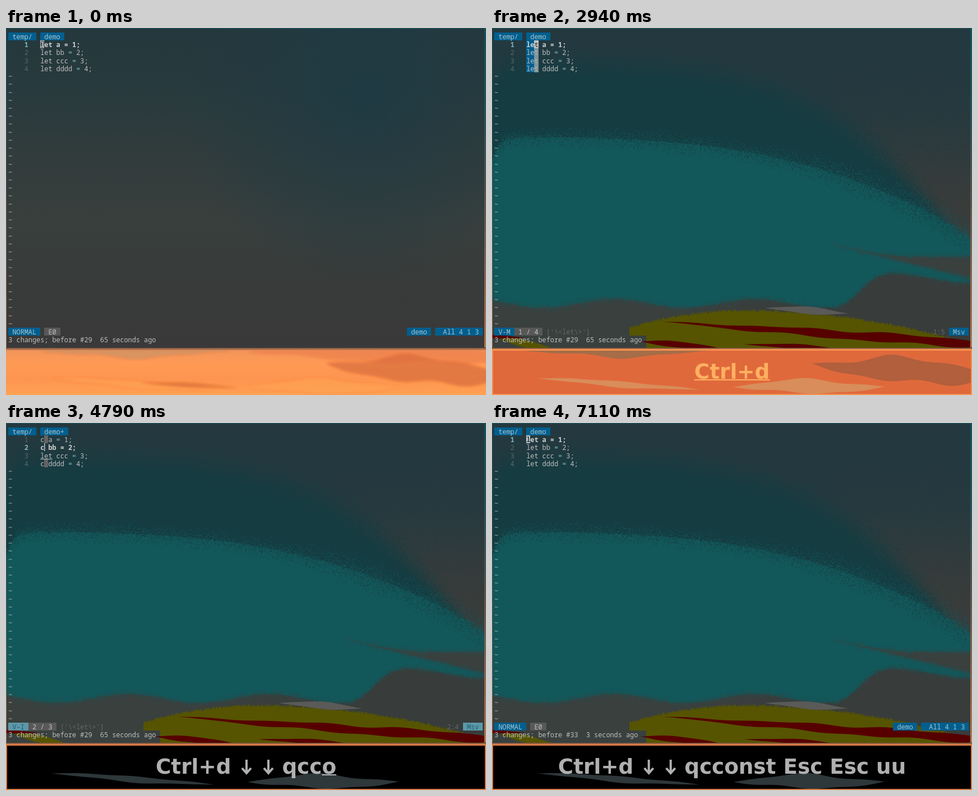
An HTML page with a canvas for the animation above (8 s loop, 856 by 654 pixels).

```html
<!DOCTYPE html>
<html lang="en">
<head>
<meta charset="utf-8">
<title>Multiple cursors demo</title>
<style>
html, body { margin: 0; width: 100%; height: 100%; overflow: hidden; background: #000; }
canvas { display: block; }
</style>
</head>
<body>
<canvas id="stage" width="856" height="654"></canvas>
<script>
const LOOP = 8000, WIDTH = 856, HEIGHT = 654;
const CELL = 7.11, ROW = 14.22, LEFT = 4.3, TOP = 8;
const BLUE = '#005f8f', GREY = '#585858', TEXT = '#bdbdbd', PALE = '#a9c3cd', DIM = '#59666a';
const ctx = document.getElementById('stage').getContext('2d');

let seed = 7;
const random = () => (seed = seed * 16807 % 2147483647) / 2147483647;
const mix = (a, b, u) => a.map((v, i) => v + (b[i] - v) * u);
const smooth = (from, to, v) => {
  const u = Math.min(1, Math.max(0, (v - from) / (to - from)));
  return u * u * (3 - 2 * u);
};

function layer(paint) {
  const canvas = document.createElement('canvas');
  canvas.width = WIDTH;
  canvas.height = HEIGHT;
  paint(canvas.getContext('2d'));
  return canvas;
}

function clipTo(c, ...rect) {
  c.beginPath();
  c.rect(...rect);
  c.clip();
}

function gradient(c, y0, y1, ...colors) {
  const g = c.createLinearGradient(0, y0, 0, y1);
  colors.forEach((color, i) => g.addColorStop(i / (colors.length - 1), color));
  return g;
}

// Lens-shaped wisp with an uneven outline
function streak(c, color, x0, y0, x1, y1, half) {
  c.fillStyle = color;
  for (let x = x0; x < x1; x++) {
    const u = (x - x0) / (x1 - x0);
    const h = half * Math.sin(Math.PI * u) * (.85 + .15 * Math.sin(x / 19 + y0));
    c.fillRect(x, y0 + (y1 - y0) * u + Math.sin(x / 31) * half / 8 - h, 1, 2 * h);
  }
}

// The same wisps show in the sky and through both key panels
const clouds = [
  ['blush', 430, 575, 1000, 588, 16],
  ['earth', 60, 574, 400, 574, 14],
  ['shade', 570, 599, 920, 622, 25],
  ['light', 80, 624, 370, 645, 6],
  ['light', 430, 638, 700, 640, 14],
  ['rust', 240, 632, 412, 641, 3]
];

function paintClouds(c, colors) {
  for (const [kind, ...shape] of clouds) if (colors[kind]) streak(c, colors[kind], ...shape);
}

const sky = layer(c => {
  c.fillStyle = gradient(c, 570, HEIGHT, '#f0945c', '#ff9a55', '#fd9550', '#ffa152');
  c.fillRect(0, 0, WIDTH, HEIGHT);
  c.filter = 'blur(2px)';
  paintClouds(c, { blush: '#f18350', earth: '#ce966b', shade: '#dc6d3f', light: '#ffa557', rust: '#d96f3c' });
  c.filter = 'none';
  c.fillStyle = gradient(c, 0, 572, '#15525b', '#25555a', '#545450', '#866752', '#b07a55');
  c.fillRect(0, 0, WIDTH, 571);
  c.fillStyle = gradient(c, 569, 576, '#70503f', '#a86d4b', 'rgba(240,148,92,0)');
  c.fillRect(0, 569, WIDTH, 7);
});

const softBack = layer(c => {
  clipTo(c, 1, 1, 852, 569);
  c.fillStyle = gradient(c, 0, 570, '#24383d', '#283a3d', '#323c3c', '#383f3d', '#383b3a', '#3a3939');
  c.fillRect(0, 0, WIDTH, HEIGHT);
  const glow = c.createRadialGradient(640, 120, 20, 640, 120, 330);
  glow.addColorStop(0, 'rgba(31,58,67,.9)');
  glow.addColorStop(1, 'rgba(31,58,67,0)');
  c.fillStyle = glow;
  c.fillRect(0, 0, WIDTH, HEIGHT);
});

const SLATE = [36, 57, 63], ASH = [56, 60, 59], DEEP = [20, 60, 65], TEAL = [18, 87, 90], GROUND = [57, 64, 62];
const tealTop = x => 193 + 180 * (x / WIDTH) ** 3 + 40 * Math.exp(-x / 12);
const tealBottom = x => 489 + 8 * Math.cos((x - 90) / 40) - 45 * smooth(610, 700, x);
const oliveTop = x => 503 + (x - 450) ** 2 / (x < 450 ? 1400 : 2700);

function inWedge(x, y) {
  const d = x - 605;
  return d > 0 && y > 384 + 22 * Math.sin(Math.min(1, d / 160) * Math.PI / 2) && y < 385 + d * .24;
}

function backColor(x, y) {
  const grain = (random() * 2 - 1) ** 3;
  const top = tealTop(x), edge = y + grain * (22 + 14 * smooth(420, 700, x));
  if (y + grain * 9 > tealBottom(x)) return mix(GROUND, ASH, smooth(250, 700, x));
  if (edge > top) return inWedge(x, y + grain * 8) ? GROUND : TEAL;
  const depth = 135 * (1 - (x / 800) ** 5);
  const base = mix(SLATE, ASH, smooth(110, 320, y + grain * 70) * smooth(420, 700, x));
  return mix(DEEP, base, smooth(depth - 35, depth + 35, top - y + grain * 40));
}

const bandedBack = layer(c => {
  const image = c.createImageData(852, 569);
  for (let i = 0; i < image.data.length; i += 4) {
    const p = i / 4;
    image.data.set([...backColor(p % 852, Math.floor(p / 852)), 255], i);
  }
  c.putImageData(image, 1, 1);
  clipTo(c, 1, 1, 852, 569);
  c.fillStyle = '#565400';
  for (let x = 245; x < 853; x++) {
    const y = oliveTop(x) + random() * 5 - 2;
    c.fillRect(x, y, 1, (x < 275 ? 548 : 570) - y);
  }
  streak(c, '#5a5a58', 486, 499, 635, 508, 7);
  streak(c, '#560000', 305, 524, 1100, 580, 9);
  streak(c, '#560000', 265, 558, 420, 574, 7);
  streak(c, '#560000', 450, 563, 640, 574, 5);
  streak(c, '#565400', 10, 552, 110, 572, 7);
  streak(c, '#560000', -40, 548, 60, 552, 3);
});

function panel(base, border, colors) {
  return layer(c => {
    c.fillStyle = border;
    c.fillRect(0, 572, WIDTH, 82);
    c.fillStyle = base;
    c.fillRect(2, 575, 852, 77);
    clipTo(c, 2, 575, 852, 77);
    paintClouds(c, colors);
  });
}

const warmPanel = panel('#e0693c', '#f6914f', { earth: '#a56d48', shade: '#b15f3d', light: '#d88d5a' });
const darkPanel = panel('#000', '#d97b45', { light: '#2e373a' });

const keys = [[2940, 'Ctrl+d'], [3340, '↓'], [3680, '↓'], [4310, 'q'], [4310, 'c'],
  [4690, 'c'], [4790, 'o'], [4890, 'n'], [5000, 's'], [5200, 't'],
  [5590, 'Esc'], [5740, 'Esc'], [6790, 'u'], [6920, 'u']];
const isLetter = key => /^[a-z]$/.test(key);

// Replays the keys pressed so far; letters reach the editor a little late
function editorAt(t) {
  const s = { mode: 'NORMAL', line: 1, word: 'let', dropped: 0, undone: false };
  for (const [time, key] of keys) {
    if (t < time + (isLetter(key) ? 40 : 0)) break;
    if (key === 'Ctrl+d') s.mode = 'V-M';
    else if (key === '↓') s.line++;
    else if (key === 'q') s.dropped = s.line--;
    else if (key === 'Esc') s.mode = s.mode === 'V-I' ? 'V-M' : 'NORMAL';
    else if (key === 'u') Object.assign(s, { line: 1, word: 'let', dropped: 0, undone: true });
    else if (s.mode === 'V-I') s.word += key;
    else Object.assign(s, { mode: 'V-I', word: '' });
  }
  return s;
}

const words = ('const,const int,constant,construct,constantly,constitute,constraint,constitutes,' +
  'constructed,constraints,construction,constitution,constitutional,consent,contest,consult,' +
  'consist,contrast,consists,contests,consulting,consistent,consultant,consortium,consisting,' +
  'consultants,consumption,consultancy,consecutive,consistency,conservation,consultation,' +
  'conservative,consolidated,consistently').split(',');

const colX = col => LEFT + col * CELL;
const rowY = row => TOP + row * ROW;

function box(row, col, count, color, rows = 1) {
  const x = Math.round(colX(col)), y = Math.round(rowY(row));
  ctx.fillStyle = color;
  ctx.fillRect(x, y, Math.round(colX(col + count)) - x, Math.round(rowY(row + rows)) - y);
}

function put(row, col, text, color = TEXT, bold = false) {
  ctx.font = `${bold ? 'bold ' : ''}12px "Noto Sans Mono", monospace`;
  ctx.fillStyle = color;
  [...text].forEach((ch, i) => ctx.fillText(ch, colX(col + i), rowY(row) + 12));
}

function label(row, col, text, bg = BLUE, color = PALE) {
  box(row, col, text.length, bg);
  put(row, col, text, color);
}

function drawLine(n, focused, { mode, line, word, dropped }) {
  const here = n === line, skipped = n === dropped;
  const insert = mode === 'V-I' && !skipped, multi = mode === 'V-M' && !skipped;
  const own = skipped ? 'let' : insert && !here ? word.slice(0, 2) : word;
  const text = `${own} ${'abcd'[n - 1].repeat(n)} = ${n};`;
  const last = 7 + own.length;
  const caret = own === 'let' ? 8 : last;
  const normal = mode === 'NORMAL' && here, block = normal && focused;

  put(n, 4, String(n), here ? '#7fb4c1' : DIM, here);
  if (multi) {
    box(n, 8, own.length - 1, BLUE);
    box(n, last, 1, here ? '#c4c4c4' : '#7d959e');
  }
  if (insert && !here) box(n, last + 1, 1, '#646464');
  if (block) box(n, caret, 1, '#c4c4c4');

  [...text].forEach((ch, i) => {
    const col = 8 + i;
    let color = here ? '#cfcfcf' : ch === '=' ? '#74b3b3' : TEXT;
    if (block && col === caret) color = '#24454a';
    if (multi && col === last) color = here ? '#4d5a5e' : '#a3b0b4';
    put(n, col, ch, color, here);
  });

  if (normal && !focused) {
    ctx.strokeStyle = '#c4c4c4';
    ctx.lineWidth = 1;
    ctx.strokeRect(Math.round(colX(caret)) + .5, Math.round(rowY(n)) + .5, 6, 13);
  }
  ctx.fillStyle = TEXT;
  if (skipped && mode !== 'NORMAL') ctx.fillRect(colX(8), Math.round(rowY(n)) + 13, CELL * 3, 1);
  if (insert && here) ctx.fillRect(Math.round(colX(last + 1)), Math.round(rowY(n)), 1.5, 14);
}

function drawStatus({ mode, line, word, dropped, undone }) {
  const name = word === 'let' ? 'demo' : 'demo+';
  label(0, 0, ' temp/ ');
  label(0, 8, ` ${name} `);
  if (mode === 'NORMAL') {
    label(37, 0, ' NORMAL ');
    label(37, 9, ' E0 ', GREY, TEXT);
    label(37, 104 - name.length, ` ${name} `);
    label(37, 107, `  All 4 ${line} ${word === 'let' ? 3 : 7} `);
  } else {
    const insert = mode === 'V-I';
    const colors = insert ? ['#5d98a8', '#1b5e74'] : [BLUE, PALE];
    label(37, 0, ` ${mode} `, ...colors);
    label(37, 5, ` ${line} / ${dropped ? 3 : 4} `, GREY, '#c4c4c4');
    put(37, 13, "['\\<let\\>']", '#60686a');
    put(37, 110, `${line}:${word.length + (insert ? 3 : 2)}`, '#60686a');
    label(37, 114, ' Msv ', ...colors);
  }
  put(38, 0, `3 changes; before #${undone ? '33  3' : '29  65'} seconds ago`);
}

function drawMenu() {
  box(3, 7, 24, GREY, words.length);
  words.forEach((word, i) => {
    put(3 + i, 8, word, '#b4b4b4');
    put(3 + i, 23, i < 2 ? '[TN]' : '[10K]', '#b4b4b4');
  });
}

function drawArrow(x, color) {
  ctx.strokeStyle = color;
  ctx.lineWidth = 4;
  ctx.beginPath();
  ctx.moveTo(x, 600);
  ctx.lineTo(x, 624);
  ctx.moveTo(x - 8, 615);
  ctx.lineTo(x, 624);
  ctx.lineTo(x + 8, 615);
  ctx.stroke();
}

function drawKeys(t) {
  const pressed = keys.filter(([time]) => time <= t);
  if (!pressed.length) return;
  const fade = Math.min(1, Math.floor((t - keys[0][0]) / 40) / 4);
  ctx.drawImage(warmPanel, 0, 0);
  ctx.globalAlpha = fade;
  ctx.drawImage(darkPanel, 0, 0);
  ctx.globalAlpha = 1;

  ctx.font = 'bold 37.33px "DejaVu Sans", sans-serif';
  const width = s => s === '↓' ? 26 : ctx.measureText(s).width;
  const shown = pressed.map(([time, key], i) => {
    const joined = !i || isLetter(key) && isLetter(keys[i - 1][1]);
    return { time, key, gap: joined ? 0 : width(' '), w: width(key) };
  });
  const color = `rgb(${255 - 79 * fade},176,${96 + 80 * fade})`;
  let x = WIDTH / 2 - shown.reduce((sum, k) => sum + k.gap + k.w, 0) / 2;
  shown.forEach(({ time, key, gap, w }, i) => {
    x += gap;
    ctx.fillStyle = color;
    if (key === '↓') drawArrow(x + 14.5, color);
    else ctx.fillText(key, x, 625);
    if (i === shown.length - 1 && t < time + (i ? 190 : 160)) ctx.fillRect(x, 626, w, 2);
    x += w;
  });
}

function draw(t) {
  const state = editorAt(t), focused = t >= 570;
  ctx.drawImage(sky, 0, 0);
  ctx.drawImage(softBack, 0, 0);
  ctx.globalAlpha = focused ? Math.min(1, Math.floor((t - 530) / 40) / 6) : 0;
  ctx.drawImage(bandedBack, 0, 0);
  ctx.globalAlpha = 1;

  for (let n = 1; n <= 4; n++) drawLine(n, focused, state);
  for (let row = 5; row < 37; row++) put(row, 0, '~');
  drawStatus(state);
  if (state.mode === 'V-I' && state.word.length > 2) drawMenu();
  drawKeys(t);
}

const start = performance.now();
function tick() {
  draw((performance.now() - start) % LOOP);
  requestAnimationFrame(tick);
}
tick();
</script>
</body>
</html>
```
